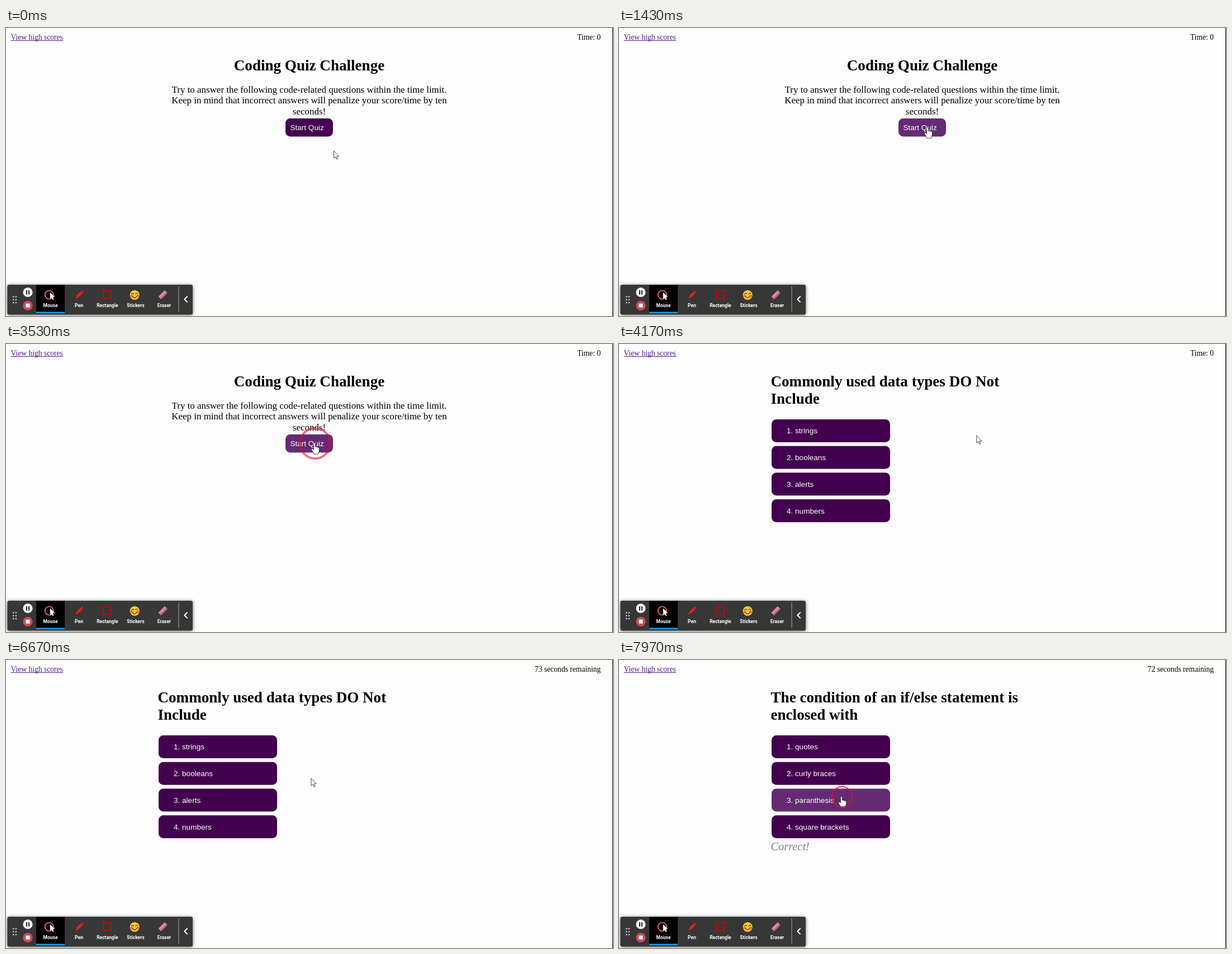
Animation, 1086 px wide and 516 px high, one loop 8000 ms. Source, as an HTML page with a canvas:

```html
<!DOCTYPE html>
<html lang="en">
<head>
<meta charset="utf-8">
<title>Coding Quiz Challenge</title>
<style>
  html, body { margin: 0; width: 100%; height: 100%; overflow: hidden; background: #fdfdfd; }
  canvas { display: block; }
</style>
</head>
<body>
<canvas id="stage" width="1086" height="516"></canvas>
<script>
const ctx = document.getElementById('stage').getContext('2d');
const LOOP = 8000;
const SERIF = '"Liberation Serif", "Times New Roman", serif';
const SANS = '"Liberation Sans", Arial, sans-serif';
const LABEL = 'Roboto, sans-serif';
const PURPLE = '#43004e', HOVER = '#642b72';

const START_AT = 3600, NEXT_AT = 7800, FIRST_TICK = 4570;
const CLICKS = [{ t: 3480, x: 553, y: 178 }, { t: 7700, x: 399, y: 245 }];
const RING_MS = 300;

// Pointer stops: time, x, y
const PATH = [
  [0, 586.5, 220], [250, 586.5, 220], [950, 553, 178], [3900, 553, 178],
  [4850, 991.5, 107], [5650, 991.5, 107], [6670, 546, 212], [7200, 399, 245], [LOOP, 399, 245]
];

const QUESTIONS = [
  { title: ['Commonly used data types DO Not', 'Include'],
    answers: ['strings', 'booleans', 'alerts', 'numbers'] },
  { title: ['The condition of an if/else statement is', 'enclosed with'],
    answers: ['quotes', 'curly braces', 'paranthesis', 'square brackets'], note: 'Correct!' }
];

function text(str, x, y, font, color = '#000', align = 'left') {
  ctx.font = font;
  ctx.fillStyle = color;
  ctx.textAlign = align;
  ctx.fillText(str, x, y);
}

function rect(x, y, w, h, color) {
  ctx.fillStyle = color;
  ctx.fillRect(x, y, w, h);
}

function box(x, y, w, h, r, color) {
  ctx.fillStyle = color;
  ctx.beginPath();
  ctx.roundRect(x, y, w, h, r);
  ctx.fill();
}

function disc(x, y, r, color) {
  ctx.fillStyle = color;
  ctx.beginPath();
  ctx.arc(x, y, r, 0, Math.PI * 2);
  ctx.fill();
}

function arc(x, y, r, color, width, from = 0, to = Math.PI * 2) {
  ctx.strokeStyle = color;
  ctx.lineWidth = width;
  ctx.beginPath();
  ctx.arc(x, y, r, from, to);
  ctx.stroke();
}

function shape(d, x, y, fill, stroke, width = 1, scale = 1, turn = 0) {
  const path = new Path2D(d);
  ctx.save();
  ctx.translate(x, y);
  ctx.rotate(turn);
  ctx.scale(scale, scale);
  ctx.lineJoin = 'round';
  if (fill) { ctx.fillStyle = fill; ctx.fill(path); }
  if (stroke) { ctx.strokeStyle = stroke; ctx.lineWidth = width; ctx.stroke(path); }
  ctx.restore();
}

const ARROW = 'M0 0V13.4L3.1 10.5L5.1 15.2L7.2 14.3L5.2 9.8H9.3Z';
const HAND = 'M-3 1.2Q-3-.6-1.5-.6T0 1.2V6.2Q1.2 5.4 2.4 6.7Q3.8 6 4.8 7.4Q7.2 6.9 7.2 9.2' +
  'V12.5Q7.2 15 5.6 17V19.2H-2.8V17.4Q-4.8 14.5-6.6 11.6Q-7.4 9.6-5.9 9.4Q-4.4 9.4-3 11.4Z';

function pointerAt(t) {
  const i = Math.max(1, PATH.findIndex(p => p[0] > t));
  const [t0, x0, y0] = PATH[i - 1], [t1, x1, y1] = PATH[i];
  const p = (t - t0) / (t1 - t0), e = p * p * (3 - 2 * p);
  return { x: x0 + (x1 - x0) * e, y: y0 + (y1 - y0) * e };
}

function button(b, label, pad, base, mouse) {
  const over = mouse.x > b.x && mouse.x < b.x + b.w && mouse.y > b.y && mouse.y < b.y + b.h;
  box(b.x, b.y, b.w, b.h, 8.5, over ? HOVER : PURPLE);
  text(label, b.x + pad, b.y + base, `13.55px ${SANS}`, '#fff');
  return over;
}

function drawIntro(mouse) {
  text('Coding Quiz Challenge', 542.5, 76, `bold 27.1px ${SERIF}`, '#000', 'center');
  ['Try to answer the following code-related questions within the time limit.',
   'Keep in mind that incorrect answers will penalize your score/time by ten',
   'seconds!'].forEach((line, i) =>
    text(line, 542.5, 115.8 + i * 19.5, `16.95px ${SERIF}`, '#000', 'center'));
  return button({ x: 500, y: 162, w: 85, h: 32.6 }, 'Start Quiz', 8.5, 21, mouse);
}

function drawQuestion(q, mouse) {
  q.title.forEach((line, i) => text(line, 271.5, 76 + i * 31.4, `bold 27.1px ${SERIF}`));
  let over = false;
  q.answers.forEach((answer, i) => {
    const b = { x: 273, y: 135 + i * 47.75, w: 212, h: 41 };
    over = button(b, `${i + 1}. ${answer}`, 27, 25.4, mouse) || over;
  });
  if (q.note) text(q.note, 271.5, 341, `italic 20.35px ${SERIF}`, '#808080');
  return over;
}

function drawHeader(t) {
  const link = 'View high scores', purple = '#551a8b';
  text(link, 8.6, 21, `13.55px ${SERIF}`, purple);
  rect(8.6, 22, 93.6, 1, purple);
  const left = 75 - Math.floor((t - FIRST_TICK) / 1000);
  const status = t < FIRST_TICK ? 'Time: 0' : `${left} seconds remaining`;
  text(status, 1064, 21, `13.55px ${SERIF}`, '#000', 'right');
}

function drawToolbar() {
  ctx.save();
  ctx.shadowColor = 'rgba(0,0,0,.6)';
  ctx.shadowBlur = 6;
  ctx.shadowOffsetY = 1;
  box(2.5, 460, 331.5, 53.5, 3, '#373737');
  ctx.restore();

  for (let i = 0; i < 6; i++) disc(13.3 + (i % 2) * 4.6, 481.5 + (i >> 1) * 5.3, 1.3, '#d5d5d5');

  disc(39, 473.5, 8.6, '#efefef');
  rect(36, 470, 2, 7.4, '#222');
  rect(40, 470, 2, 7.4, '#222');
  disc(39, 497.3, 8.6, '#d04a56');
  box(35.5, 493.8, 7, 7, 1, '#fff');

  rect(54, 460, 51, 51, '#000');
  rect(54, 508.5, 51, 2.5, '#1a9bea');
  arc(77.3, 478, 7.6, '#ee6670', 1.9);
  shape(ARROW, 79, 473.5, '#fff', null, 1, 0.9);

  // Pen
  shape('M-2.2-5.5H2.2V5H-2.2ZM-2.2-6.5V-8Q-2.2-9 0-9T2.2-8V-6.5ZM-2.2 5.6H2.2L0 9.5Z',
    130.8, 478, '#ed1c24', null, 1, 1, Math.PI / 4);
  // Rectangle
  ctx.strokeStyle = '#d00008';
  ctx.lineWidth = 2;
  ctx.strokeRect(174, 471, 14, 13.5);
  // Sticker
  disc(230.2, 478.3, 8.6, '#fbc935');
  disc(224.8, 480, 2.5, '#f0684c');
  disc(235.6, 480, 2.5, '#f0684c');
  arc(226.7, 477, 2, '#5b3a12', 1.2, Math.PI, 0);
  arc(233.7, 477, 2, '#5b3a12', 1.2, Math.PI, 0);
  arc(230.2, 480, 3.6, '#5b3a12', 1.3, 0.2, Math.PI - 0.2);
  // Eraser
  shape('M-8-3.5H8V3.5H-8Z', 280.7, 478, '#d9899f', null, 1, 1, -Math.PI / 4);
  shape('M-8 1H8V3.5H-8Z', 280.7, 478, '#b4637d', null, 1, 1, -Math.PI / 4);

  [['Mouse', 79.5], ['Pen', 130.5], ['Rectangle', 181.3], ['Stickers', 232], ['Eraser', 283]]
    .forEach(([name, x]) => text(name, x, 500, `bold 8.5px ${LABEL}`, '#fff', 'center'));

  rect(308.5, 463, 1, 45, '#a5a5a5');
  shape('M3-5.4L-2.4 0L3 5.4', 321.7, 486, null, '#fff', 2);
}

function drawRing(t) {
  for (const c of CLICKS) {
    const p = (t - c.t) / RING_MS;
    if (p < 0 || p > 1) continue;
    arc(c.x, c.y, 29.3 - 12.5 * p, `rgba(224,12,40,${0.52 + 0.35 * p})`, 4.4 - 2.5 * p);
  }
}

function draw(t) {
  const mouse = pointerAt(t);
  rect(0, 0, 1086, 516, '#fdfdfd');
  drawHeader(t);
  const over = t < START_AT ? drawIntro(mouse)
    : drawQuestion(QUESTIONS[t < NEXT_AT ? 0 : 1], mouse);
  rect(1085, 0, 1, 516, '#000');
  drawToolbar();
  if (over) shape(HAND, mouse.x + 0.3, mouse.y, '#fff', '#222', 0.8);
  else shape(ARROW, mouse.x, mouse.y, '#fff', '#333', 0.9);
  drawRing(t);
}

const begin = performance.now();
function tick() {
  draw((performance.now() - begin) % LOOP);
  requestAnimationFrame(tick);
}
tick();
</script>
</body>
</html>
```
